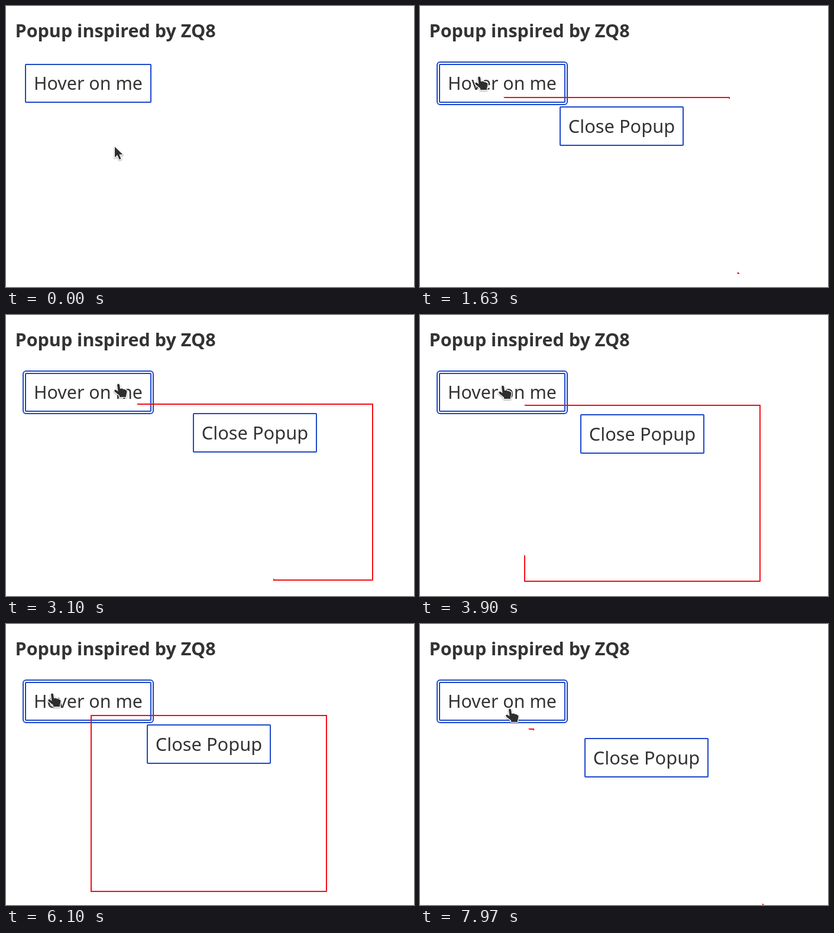
An HTML page for the animation above (8 s loop, 690x476 px).

```html
<!DOCTYPE html>
<html lang="en">
<head>
<meta charset="utf-8">
<title>Hover popup</title>
<style>
html, body { margin: 0; width: 100%; height: 100%; overflow: hidden; background: #fff; }
body { position: relative; color: #333; font: 30.4px "Noto Sans", "Open Sans", sans-serif; }
h1, div, svg { position: absolute; box-sizing: border-box; white-space: nowrap; }
h1 { left: 15.5px; top: 21px; margin: 0; font-size: 30.5px; line-height: 40px; font-weight: 700; }
.button { height: 66px; border: 2px solid #1d48ca; border-radius: 2px; line-height: 62px; text-align: center; }
.ring::after {
  content: ""; position: absolute; inset: -6px;
  border: 2px solid #1d48ca; border-radius: 6px;
}
#hover { left: 32px; top: 98px; width: 214px; }
#close { left: 95px; top: 16px; width: 210px; height: 67px; font-size: 30.8px; }
#popup { left: 0; top: 0; width: 400px; height: 300px; }
.edge { box-sizing: content-box; border: 2px solid transparent; }
#first { left: 0; top: 0; border-top-color: #f20d14; border-right-color: #f20d14; }
#second { right: 0; bottom: 0; border-bottom-color: #f20d14; border-left-color: #f20d14; }
#cursor { left: 0; top: 0; width: 1px; height: 1px; overflow: visible; }
#cursor path {
  fill: #2e2e2e; stroke: #fff; stroke-width: 2.6; stroke-linejoin: round; paint-order: stroke;
  filter: drop-shadow(0 1px 1px rgba(0, 0, 0, .4));
}
</style>
</head>
<body>
<h1>Popup inspired by ZQ8</h1>
<div id="hover" class="button">Hover on me</div>
<div id="popup">
  <div id="first" class="edge"></div>
  <div id="second" class="edge"></div>
  <div id="close" class="button">Close Popup</div>
</div>
<svg id="cursor">
  <path id="arrow" d="M0 .5V18.5L4.3 14.6L7.6 22L10.6 20.7L7.4 13.6H13.5Z"/>
  <path id="hand" d="M-1 0Q1-3 3 0L4 7L7 6.5Q9 6.5 9.5 8Q12 7.3 13 9Q15.5 9 15.5 11.5L15 15Q14.5 17 14 18.5V21H3V18.5L-5 12Q-7 9-4 8.5Q-2 9 .5 11.5Z"/>
</svg>
<script>
const LOOP = 8000, LAG = 35, LOCK = 4830, CLOSED = 7100;
const el = id => document.getElementById(id);
const clamp = k => Math.min(1, Math.max(0, k));
const ease = k => (1 - Math.cos(Math.PI * clamp(k))) / 2;

// Pointer moves: start, end, target x, target y
const home = [184, 238];
const moves = [
  [270, 740, 154, 161], [880, 890, 148, 125], [1400, 1760, 79, 119],
  [1760, 2490, 174, 126], [2490, 2850, 196, 120], [2850, 3065, 189, 118],
  [3400, 4250, 111, 122], [5330, 5830, 160, 122], [5950, 6100, 77, 119],
  [6270, 6650, 245, 292], [6650, 6970, 310, 208], [7100, 7850, 154, 161],
  [7870, 7930, 151, 145]
];
const holds = [[770, 930], [7870, 7970]];
const sideTimes = [1000, 930, 910, 1200];

function pointer(t) {
  let [x, y] = home;
  for (const [from, to, tx, ty] of moves) {
    const k = ease((t - from) / (to - from));
    x += (tx - x) * k;
    y += (ty - y) * k;
  }
  return [Math.round(x), Math.round(y)];
}

// Each side grows once the one before it is complete
function outline(age) {
  const [top, right, bottom, left] = sideTimes.map(time => {
    const k = ease(age / time);
    age -= time;
    return k;
  });
  size(el("first"), top, right);
  size(el("second"), bottom, left);
}

function size(node, w, h) {
  node.style.width = 396 * w + "px";
  node.style.height = 296 * h + "px";
}

const show = (node, on) => node.style.display = on ? "" : "none";
const move = (node, x, y) => node.style.transform = `translate(${x}px, ${y}px)`;
const inside = (x, y, left, top, w, h) => x >= left && x < left + w && y >= top && y < top + h;

function draw(t) {
  for (const [from, to] of holds) if (t > from && t < to) t = from;

  const [x, y] = pointer(t);
  const again = t >= CLOSED;
  const open = t >= 750 && !again || t >= 7865;
  const [px, py] = pointer(again ? t - LAG : Math.min(t - LAG, LOCK));
  const left = px + 32, top = py + 32;

  show(el("popup"), open);
  move(el("popup"), left, top);
  outline(t - (again ? 7890 : 765));

  const onHover = inside(x, y, 32, 98, 214, 66);
  const onClose = open && inside(x, y, left + 95, top + 16, 210, 67);
  el("hover").classList.toggle("ring", onHover);
  el("close").classList.toggle("ring", onClose);

  show(el("hand"), onHover || onClose);
  show(el("arrow"), !onHover && !onClose);
  move(el("cursor"), x, y);
}

const start = performance.now();
function tick() {
  draw((performance.now() - start) % LOOP);
  requestAnimationFrame(tick);
}
tick();
</script>
</body>
</html>
```
